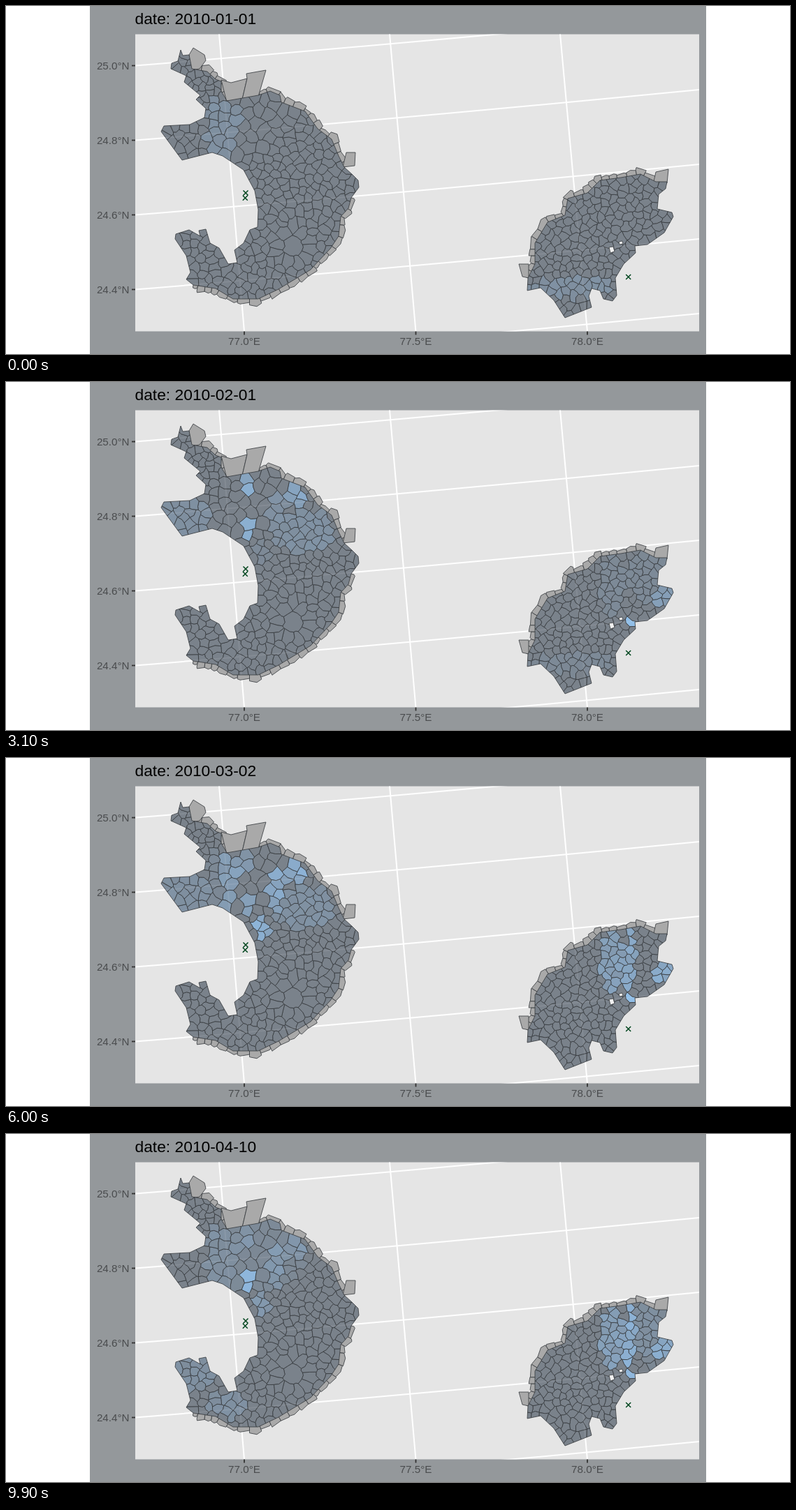
These frames come from a looping animation (1122 by 499 pixels, 10000 ms). An HTML page:

```html
<!DOCTYPE html>
<html lang="en">
<head>
<meta charset="utf-8">
<title>Daily map</title>
<style>
  html, body { margin: 0; width: 100%; height: 100%; overflow: hidden; background: #fff; }
  svg { display: block; width: 1122px; height: 499px; font-family: "Liberation Sans", Arial, sans-serif; }
  .grid { fill: none; stroke: #fff; stroke-width: 2; }
  .tick { stroke: #333; stroke-width: 1.8; }
  .label { font-size: 15.2px; fill: #4a4c4e; }
  .line { stroke: #34383c; stroke-width: .8; stroke-linejoin: round; }
  .fringe { fill: #a9a9a9; }
  .core { fill: #7a828b; }
  .edge { fill: none; }
  .cross { fill: none; stroke: #00451d; stroke-width: 1.5; }
</style>
</head>
<body>
<svg id="stage" viewBox="0 0 1122 499">
  <defs><clipPath id="panel"><rect x="185" y="40.5" width="807" height="426"/></clipPath></defs>
  <rect x="120" width="882" height="499" fill="#94989b"/>
  <rect x="185" y="40.5" width="807" height="426" fill="#e5e5e5"/>
  <g id="grid" class="grid" clip-path="url(#panel)"></g>
  <g id="axes"></g>
  <g id="map"></g>
  <path class="line" fill="#f1f1f1" d="M863 346l6-1 2 7-6 2zM877 338l5-1 1 4-5 1z"/>
  <path class="cross" d="M339.5 264.5l7 7m0-7l-7 7M338.8 271.8l7 7m0-7l-7 7M887.2 385l7 7m0-7l-7 7"/>
  <text id="date" x="184.5" y="26" font-size="22.8">date: 2010-01-01</text>
</svg>
<script>
const NS = 'http://www.w3.org/2000/svg';
const byId = id => document.getElementById(id);
function add(parent, tag, attrs, text) {
  const el = document.createElementNS(NS, tag);
  for (const key in attrs) el.setAttribute(key, attrs[key]);
  if (text) el.textContent = text;
  parent.append(el);
  return el;
}
function randomizer(seed) {
  return () => {
    seed = seed + 0x6D2B79F5 | 0;
    let t = Math.imul(seed ^ seed >>> 15, 1 | seed);
    t = t + Math.imul(t ^ t >>> 7, 61 | t) ^ t;
    return ((t ^ t >>> 14) >>> 0) / 4294967296;
  };
}

// Graticule and axes
for (let i = -1; i < 4; i++) {
  const y = 406.5 - 107 * i;
  add(byId('grid'), 'path', { d: `M185 ${y}Q588 ${y - 33} 992 ${y - 72.5}` });
  if (i < 0) continue;
  add(byId('axes'), 'path', { class: 'tick', d: `M180 ${y}h5` });
  add(byId('axes'), 'text', { class: 'label', x: 176.5, y: y + 5.5, 'text-anchor': 'end' },
    (24.4 + .2 * i).toFixed(1) + '°N');
}
for (let i = 0; i < 3; i++) {
  const x = 341 + 245.5 * i;
  add(byId('grid'), 'path', { d: `M${305 + 244 * i} 40L${x} 467` });
  add(byId('axes'), 'path', { class: 'tick', d: `M${x} 466.5v5` });
  add(byId('axes'), 'text', { class: 'label', x, y: 486, 'text-anchor': 'middle' },
    (77 + .5 * i).toFixed(1) + '°E');
}

// Each island is a clockwise outline; its rims carry a grey fringe, capes are larger fringe pieces.
const islands = [
  {
    seed: 11, box: [215, 55, 510, 435],
    rims: [
      '266,90 288,94 300,105 308,108 308,122 316,136 361,128 378,122 392,128 394,138 428,151 446,176 466,191 476,215 484,231',
      '494,275 490,290 479,302 476,330 464,348 447,366 436,378 390,406 361,420 325,420 300,405 268,400'
    ],
    bare: [
      '496,242 504,250 505,260',
      `258,392 264,382 258,358 242,334 243,327 262,321 278,330 276,322 286,320 292,340 305,347 318,370 331,368
       327,350 340,340 349,321 360,317 361,292 356,265 340,235 310,215 295,210 252,221 222,180 226,172 263,170
       284,160 286,147 272,134 278,128 255,109 258,100 236,90 237,82 246,79 250,63 253,71 262,70`
    ],
    capes: ['262,70 268,60 284,70 286,78 277,90 264,92', '316,138 308,106 322,110 345,104 338,134',
      '338,134 345,104 344,97 372,92 361,130', '482,231 487,210 500,210 499,229'],
    anchors: [[346, 152], [341, 174], [346, 202], [346, 223], [410, 345]],
    gap: (x, y) => Math.hypot(x - 410, (y - 345) * .8) < 24 ? 22
      : y < 135 && x < 318 ? 8.2
      : y < 225 && x > 305 && x < 400 ? 13.2 : 10.2
  },
  {
    seed: 29, box: [740, 235, 960, 450],
    rims: ['747,390 757,370 757,340 775,310 800,300 804,276 832,268 850,250 880,246 908,241 930,252'],
    bare: [`946,252 944,262 934,270 932,291 953,296 955,302 942,325 918,342 900,344 901,354 884,370 872,390 874,415
      868,423 855,420 850,408 838,405 834,416 838,432 800,447 784,422 765,404 746,408`],
    capes: ['926,256 930,238 948,234 946,254', '748,390 739,388 734,370 748,370'],
    anchors: [[897, 312], [893, 344]],
    gap: () => 9.4
  }
];

// Active zones: x, y, rx, ry and a level from 0 to 9 on each key day
const keyDays = [0, 19, 31, 47, 60, 83, 99];
const zones = [
  [300, 170, 16, 45, '2000112'], [321, 178, 14, 45, '2000402'], [346, 148, 10, 16, '0168333'],
  [346, 210, 9, 18, '0169487'], [412, 163, 17, 16, '0258693'], [388, 188, 14, 36, '0624553'],
  [365, 240, 12, 18, '0314643'], [425, 215, 45, 30, '0020200'], [258, 193, 38, 26, '0023200'],
  [315, 388, 25, 20, '0200002'], [270, 345, 28, 25, '0000002'], [365, 170, 65, 55, '0100001'],
  [805, 403, 62, 15, '2010000'], [932, 270, 14, 26, '0810001'], [918, 322, 14, 16, '0500011'],
  [893, 344, 11, 6, '0889887'], [942, 310, 14, 16, '0147666'], [895, 290, 9, 45, '0207536'],
  [870, 290, 20, 45, '0011424'], [835, 295, 26, 35, '0003020'], [790, 377, 42, 12, '0002000'],
  [915, 280, 30, 40, '0110002']
];

const warp = ([x, y]) => [x + 1.3 * Math.sin(y * .43 + x * .17), y + 1.3 * Math.sin(x * .39 - y * .21)]
  .map(v => v.toFixed(1)).join();

// Keep the part of a polygon nearer to a than to b
function nearer(poly, a, b) {
  const side = p => (p[0] - (a[0] + b[0]) / 2) * (b[0] - a[0]) + (p[1] - (a[1] + b[1]) / 2) * (b[1] - a[1]);
  const kept = [];
  poly.forEach((p, i) => {
    const q = poly[(i + 1) % poly.length], sp = side(p), sq = side(q);
    if (sp <= 0) kept.push(p);
    if (sp * sq < 0) {
      const k = sp / (sp - sq);
      kept.push([p[0] + (q[0] - p[0]) * k, p[1] + (q[1] - p[1]) * k]);
    }
  });
  return kept;
}

function scatter({ box: [x0, y0, x1, y1], gap, anchors }, random, inside) {
  const sites = [...anchors];
  for (let i = 0; i < 9000; i++) {
    const x = x0 + random() * (x1 - x0), y = y0 + random() * (y1 - y0), r = gap(x, y);
    if (sites.every(s => Math.hypot(s[0] - x, (s[1] - y) * 1.15) > r) && inside(x, y)) sites.push([x, y]);
  }
  return sites;
}

function cellPoints(site, sites) {
  const [x, y] = site, r = 28;
  let poly = [[x - r, y - r], [x + r, y - r], [x + r, y + r], [x - r, y + r]];
  for (const other of sites)
    if (other !== site && Math.hypot(other[0] - x, other[1] - y) < 2.9 * r) poly = nearer(poly, site, other);
  return poly.flatMap((p, i) => {
    const q = poly[(i + 1) % poly.length];
    return [warp(p), warp([(p[0] + q[0]) / 2, (p[1] + q[1]) / 2])];
  }).join(' ');
}

// Small grey pieces of random width and depth along the outside of a rim
function drawFringe(parent, rim, random) {
  const guide = add(parent, 'polyline', { points: rim, fill: 'none' });
  const total = guide.getTotalLength();
  const beside = (s, depth) => {
    const p = guide.getPointAtLength(s), a = guide.getPointAtLength(s - 4), b = guide.getPointAtLength(s + 4);
    const length = Math.hypot(b.x - a.x, b.y - a.y) || 1;
    return [p.x + (b.y - a.y) / length * depth, p.y - (b.x - a.x) / length * depth].map(v => v.toFixed(1)).join();
  };
  for (let s = 0; s < total;) {
    const end = Math.min(total, s + 9 + 9 * random()), depth = 5 + 6 * random();
    const points = [beside(s, -5), beside(s, depth * .7), beside(s + (end - s) * random(), depth),
      beside(end, depth * .8), beside(end, -5)].join(' ');
    add(parent, 'polygon', { class: 'fringe line', points });
    s = end;
  }
  guide.remove();
}

const cells = [];
function buildIsland(island, index) {
  const map = byId('map'), random = randomizer(island.seed), id = 'island' + index;
  const { rims, bare, capes } = island;
  const outline = rims.map((rim, i) => rim + ' ' + bare[i]).join(' ');
  const fringe = add(map, 'g', {});
  rims.forEach(rim => drawFringe(fringe, rim, random));
  for (const points of capes) add(fringe, 'polygon', { class: 'fringe line', points });

  add(add(map, 'clipPath', { id }), 'polygon', { points: outline });
  const core = add(map, 'g', { 'clip-path': `url(#${id})` });
  const edge = add(map, 'polygon', { class: 'edge line', points: outline });
  const point = byId('stage').createSVGPoint();
  const inside = (x, y) => edge.isPointInFill(Object.assign(point, { x, y }));
  const sites = scatter(island, random, inside);
  for (const site of sites) {
    const el = add(core, 'polygon', { class: 'core line', points: cellPoints(site, sites) });
    const weight = island.anchors.includes(site) ? 1 : .75 + .4 * random();
    const levels = zones
      .filter(([x, y, rx, ry]) => Math.hypot((site[0] - x) / rx, (site[1] - y) / ry) < 1)
      .map(zone => zone[4]);
    if (levels.length) cells.push({ el, weight, levels });
  }
  const overlay = add(core, 'g', { class: 'grid', opacity: .08 });
  overlay.append(...byId('grid').cloneNode(true).children);
}
islands.forEach(buildIsland);

function levelOn(day, levels) {
  const i = Math.max(1, keyDays.findIndex(k => k >= day));
  const k = (day - keyDays[i - 1]) / (keyDays[i] - keyDays[i - 1]);
  return levels[i - 1] * (1 - k) + levels[i] * k;
}
function shadeOf(level) {
  const k = Math.min(1, level / 9);
  return `rgb(${[[122, 148], [130, 197], [139, 243]].map(([a, b]) => Math.round(a + (b - a) * k))})`;
}

let shownDay = -1;
function draw() {
  const day = Math.floor(performance.now() % 10000 / 100);
  if (day !== shownDay) {
    shownDay = day;
    byId('date').textContent = 'date: ' + new Date(Date.UTC(2010, 0, 1 + day)).toISOString().slice(0, 10);
    for (const { el, weight, levels } of cells)
      el.style.fill = shadeOf(weight * Math.max(...levels.map(l => levelOn(day, l))));
  }
  requestAnimationFrame(draw);
}
draw();
</script>
</body>
</html>
```
